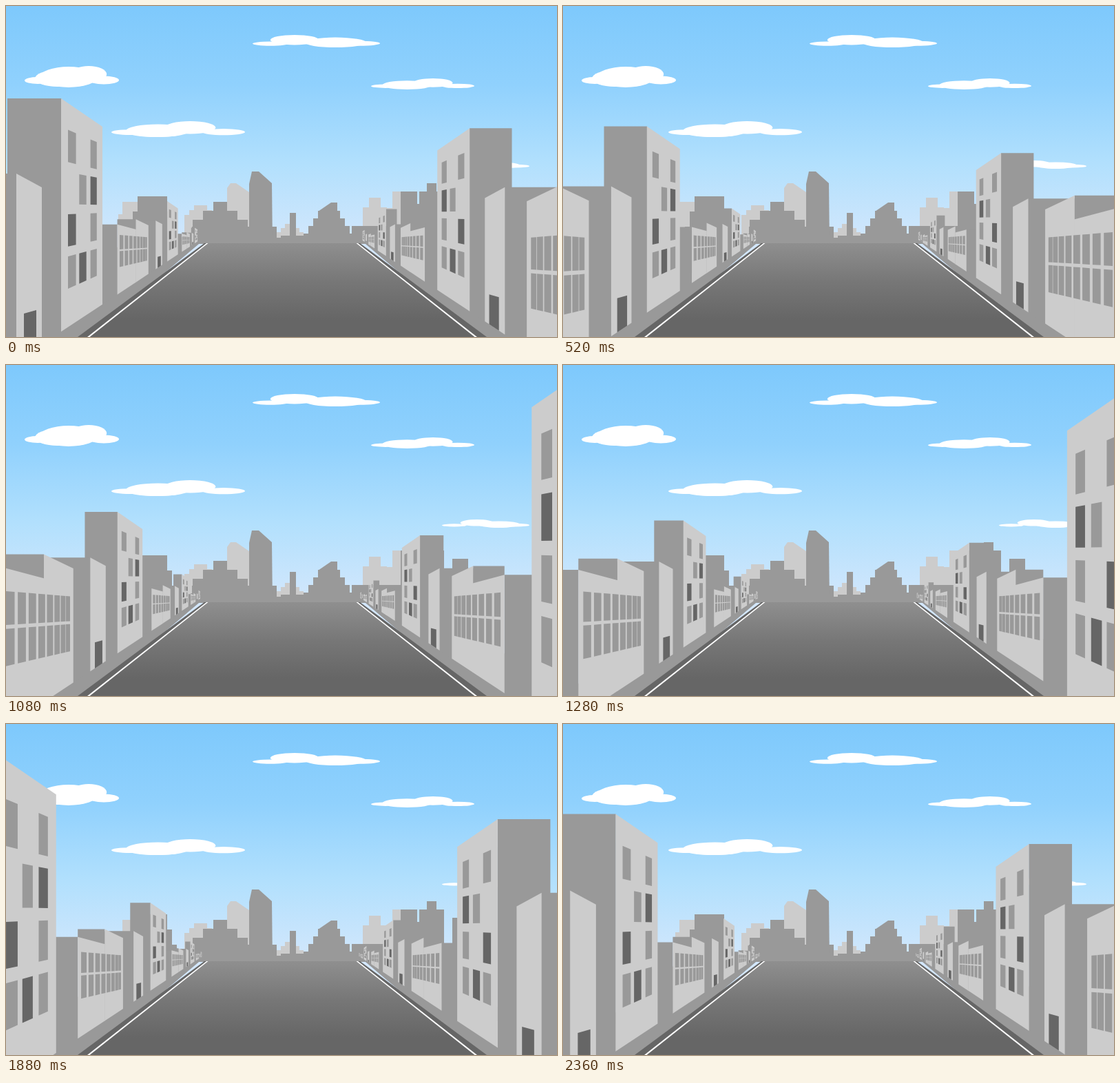
Write an HTML page with a canvas that moves like this. It is 800 px wide and 480 px high and loops after 2.4 s.

```html
<!DOCTYPE html>
<html lang="en">
<head>
<meta charset="utf-8">
<title>City street</title>
<style>
html, body { margin: 0; width: 100%; height: 100%; overflow: hidden; }
canvas { display: block; width: 800px; height: 480px; }
</style>
</head>
<body>
<canvas id="stage" width="800" height="480"></canvas>
<script>
const ctx = document.getElementById('stage').getContext('2d');
const LIGHT = '#ccc', MID = '#999', DARK = '#666';
const FRAMES = 60, STEP = 40, HORIZON = 335, ROAD_TOP = 344;
const LEFT = 288, RIGHT = 510;

function poly(color, ...pts) {
  ctx.fillStyle = color;
  ctx.beginPath();
  for (let i = 0; i < pts.length; i += 2) ctx.lineTo(pts[i], pts[i + 1]);
  ctx.fill();
}

function gradient(y0, y1, ...colors) {
  const g = ctx.createLinearGradient(0, y0, 0, y1);
  colors.forEach((c, i) => g.addColorStop(i / (colors.length - 1), c));
  return g;
}

function puff(x, y, rx, ry) {
  ctx.fillStyle = '#fff';
  ctx.beginPath();
  ctx.ellipse(x, y, rx, ry, 0, 0, 2 * Math.PI);
  ctx.fill();
}

// A long body with two tails, and a bump at `peak` along its length.
function cloud(x, y, w, h, peak) {
  const lean = peak < .5 ? 1 : -1;
  puff(x + w * (.5 + lean * .15), y + h * .6, w * .24, h * .4);
  puff(x + w * peak, y + h * .4, w * .19, h * .4);
  puff(x + w * .14, y + h * .7, w * .14, h * .17);
  puff(x + w * .84, y + h * .68, w * .16, h * .2);
}

// A block whose shoulders step down n times on both sides.
function block(color, x0, x1, top, n = 0, w = 0, h = 0) {
  ctx.fillStyle = color;
  for (let i = 0; i <= n; i++)
    ctx.fillRect(x0 - i * w, top + i * h, x1 - x0 + 2 * i * w, ROAD_TOP + 1 - top - i * h);
}

function skyline() {
  block(LIGHT, 169, 191, 284, 1, 6, 18);
  block(LIGHT, 273, 292, 289, 2, 7, 7);
  block(LIGHT, 405, 420, 316, 2, 6, 6);
  block(LIGHT, 527, 544, 278, 1, 9, 14);
  block(LIGHT, 561, 573, 269, 1, 14, 24);
  poly(LIGHT, 321, 345, 321, 264, 326, 257, 334, 257, 353, 270, 353, 345);

  block(MID, 191, 234, 276, 2, 7, 22);
  block(MID, 301, 321, 284, 2, 15, 13);
  block(MID, 270, 393, 320);
  block(MID, 387, 453, 336);
  block(MID, 412, 421, 300, 1, 13, 33);
  block(MID, 453, 485, 297, 3, 7, 11);
  block(MID, 502, 648, 319);
  block(MID, 573, 597, 269);
  block(MID, 573, 636, 287);
  block(MID, 611, 625, 257, 1, 11, 12);
  block(MID, 648, 671, 281);
  poly(MID, 353, 345, 353, 258, 357, 240, 367, 240, 386, 257, 387, 345);
  poly(MID, 453, 298, 472, 285, 481, 285, 481, 298);
}

function backdrop() {
  ctx.fillStyle = gradient(0, ROAD_TOP, '#7ec9fc', '#90d1fd', '#b2e0fd', '#d3e7fc');
  ctx.fillRect(0, 0, 800, 480);
  puff(91, 103, 42, 15);
  cloud(27, 87, 137, 30, .68);
  cloud(153, 167, 194, 23, .59);
  cloud(358, 42, 185, 18, .33);
  cloud(530, 105, 150, 16, .6);
  cloud(633, 224, 127, 12, .4);
  puff(218, 182, 44, 8);
  skyline();
  poly(MID, 292, HORIZON, 120, 480, 0, 480, 180, HORIZON);
  poly(MID, RIGHT, HORIZON, 682, 480, 800, 480, 620, HORIZON);
  poly(gradient(ROAD_TOP, 455, '#8f8f8f', '#777', DARK), 292, ROAD_TOP, 510, ROAD_TOP, 682, 480, 120, 480);
}

// A strip along the road edge, given by offsets from it at top and bottom.
function strip(color, top, inner, outer) {
  for (const [dir, x] of [[-1, 292], [1, 510]]) {
    const far = x + dir * 172;
    poly(color, x - dir * inner, ROAD_TOP, x + dir * top, ROAD_TOP, far + dir * outer, 480, far - dir * inner, 480);
  }
}

// Building parts use x as the distance out from the vanishing point.
const base = x => x * .66;

function front(x0, x1, top) {
  poly(MID, x0 - .4, top, x1, top, x1, base(x1), x0 - .4, base(x0));
}

function side(near, nearTop, far, farTop) {
  poly(LIGHT, near, nearTop, far, farTop, far, base(far), near, base(near));
}

// Heights are those at x = ref; edges tilt more the further they are from eye level.
function pane(color, x, w, top, h, ref, a, b) {
  const edge = (y, px) => y + (px - ref) * (a * y + b);
  const far = x - w, low = top + h;
  poly(color, x, edge(top, x), far, edge(top, far), far, edge(low, far), x, edge(low, x));
}

// o: window, x: dark window
const WINDOWS = ['o.o', '.ox', 'x.o', 'oxo'];

function tower() {
  front(208, 286, -201);
  side(208, -201, 148, -160);
  WINDOWS.forEach((row, r) => [...row].forEach((c, i) => {
    if (c !== '.') pane(c === 'x' ? DARK : MID, 198 - 16.3 * i, 11.6 - 1.2 * i, -138 + 51.7 * r, 39.5, 157, .0045, .195);
  }));
}

function shed() {
  front(273, 408, -92);
  side(273, -92, 236, -72);
  poly(DARK, 262, 111, 244, 106, 244, base(244), 262, base(262));
}

function warehouse() {
  front(488, 640, -70);
  poly(MID, 488, -99.5, 384, -99.5, 384, -40, 488, -68);
  side(488, -70, 383, -42);
  side(384, -99.5, 313.5, -66);
  for (let i = 0; i < 8; i++)
    for (let r = 0; r < 2; r++)
      pane(MID, 475 - 30 * i + 1.35 * i * i, 21 - 1.6 * i, 1 + 66 * r, 59 + 6 * r, 321, .0024, -.085);
}

// The same block of buildings repeats, each copy `ratio` times the nearer one.
function street(dir, vx, scale, ratio) {
  for (let i = 2; i >= -1; i--) {
    const k = scale * ratio ** i;
    ctx.setTransform(dir * k, 0, 0, k, vx, HORIZON);
    tower();
    shed();
    warehouse();
  }
  ctx.setTransform(1, 0, 0, 1, 0, 0);
}

const ease = (t, e) => t + e * t * (1 - t);

function draw(frame) {
  const t = frame / (FRAMES - 1);
  backdrop();
  street(-1, LEFT, 1 - .7365 * ease(t, .307), .259);
  street(1, RIGHT, .785 - .58 * ease(t, .5 + .47 * t ** 2.5), .256);
  strip(DARK, 4, 0, 16);
  strip('#fff', 1, 1.5, 2);
}

const start = performance.now();
let shown = -1;
function tick() {
  const frame = Math.floor(Math.max(0, performance.now() - start) / STEP) % FRAMES;
  if (frame !== shown) draw(shown = frame);
  requestAnimationFrame(tick);
}
tick();
</script>
</body>
</html>
```
